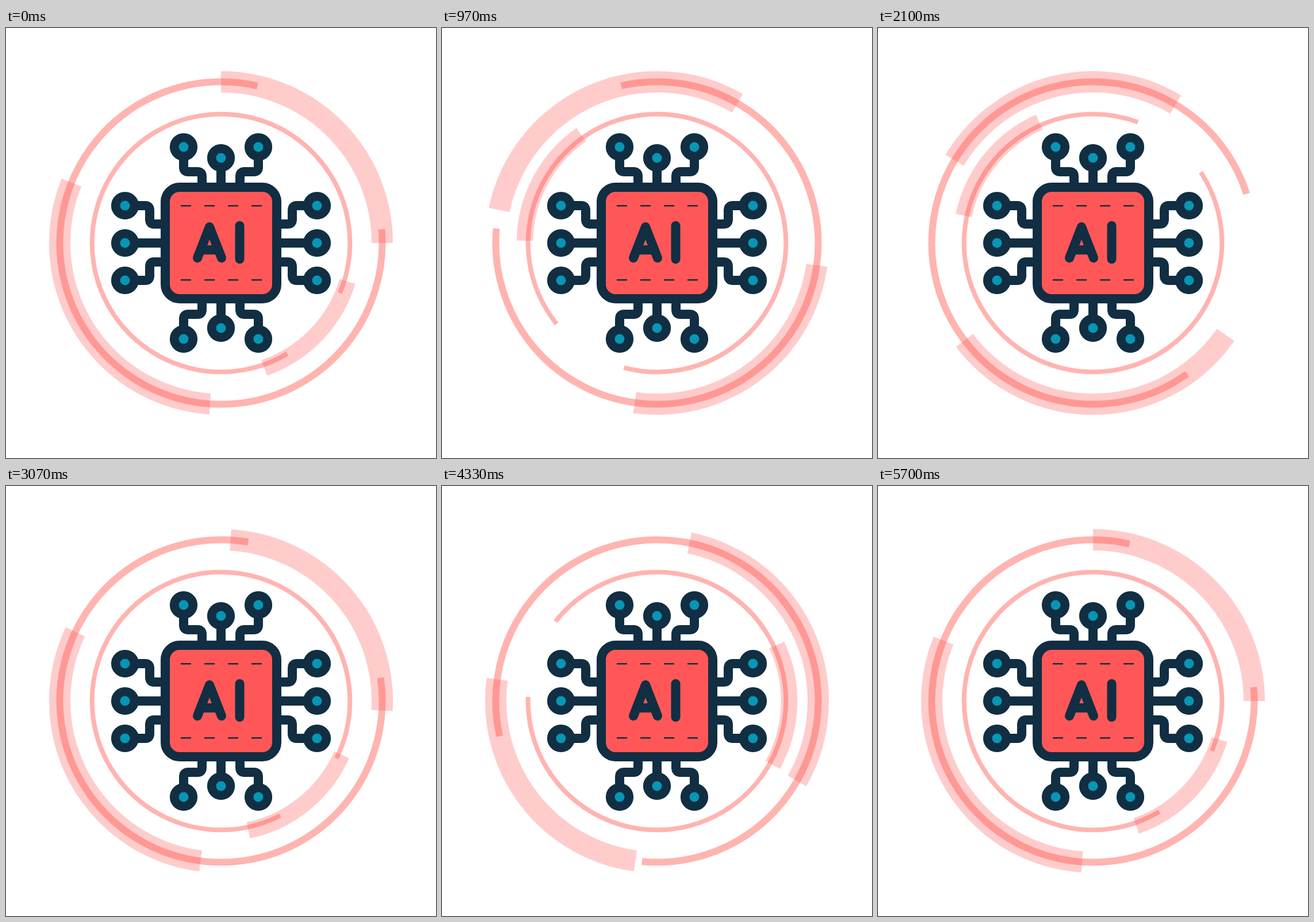
Animation of 748x748 px, one loop 5730 ms. Source, as an HTML page without scripts:

```html
<!DOCTYPE html>
<html lang="en">
<head>
<meta charset="utf-8">
<title>AI chip</title>
<style>
  @property --u { syntax: "<number>"; inherits: true; initial-value: 0; }

  html, body { margin: 0; width: 100%; height: 100%; overflow: hidden; background: #fff; }
  svg { display: block; width: 100vw; height: 100vh; }

  /* Two turns per loop, each in 36 held steps of 80 ms */
  .rings {
    animation: turn 5730ms infinite;
    --outer: calc(var(--u) * var(--u) * (3 - 2 * var(--u)));
    --inner: calc(
      0.051 * (1 - var(--u)) * (1 - var(--u)) * var(--u)
      + 2.331 * (1 - var(--u)) * var(--u) * var(--u)
      + var(--u) * var(--u) * var(--u));
  }
  @keyframes turn {
    0% { --u: 0; animation-timing-function: steps(36, jump-none); }
    50.262% { --u: 1; animation-timing-function: step-start; }
    50.263% { --u: 0; animation-timing-function: steps(35, jump-none); }
    99.127% { --u: 0.971429; animation-timing-function: step-start; }
    100% { --u: 1; }
  }

  .rings circle { fill: none; transform-origin: 374px 374px; }
  .band { stroke: #ff5757; stroke-opacity: .3; }
  .line { stroke: #ff544c; stroke-opacity: .44; }
  .a { transform: rotate(calc(-90deg + 360deg * var(--outer))); }
  .b { transform: rotate(calc(-4.9deg - 360deg * var(--outer))); }
  .c { transform: rotate(calc(59.1deg + 360deg * var(--inner))); }
  .d { transform: rotate(calc(16.9deg + 720deg * var(--inner))); }

  .chip { fill: none; stroke: #112e42; stroke-width: 16; }
  .node { fill: #0796b5; stroke-width: 15.6; }
  .body { fill: #ff5757; }
  .seam { stroke-width: 2.6; stroke-dasharray: 18 23; }
  .mark { stroke-linecap: round; stroke-linejoin: round; }
</style>
</head>
<body>
<svg viewBox="0 0 748 748" role="img" aria-label="AI">
  <defs>
    <circle id="node" class="node" r="16.3"/>
    <g id="bend">
      <path d="M309 215V242Q309 250 317 250H333Q341 250 341 258V275"/>
      <use href="#node" x="309" y="207"/>
    </g>
    <g id="side">
      <use href="#bend"/>
      <use href="#bend" transform="matrix(-1 0 0 1 748 0)"/>
    </g>
    <g id="tall">
      <path d="M374 235V275"/>
      <use href="#node" x="374" y="226"/>
    </g>
    <g id="wide">
      <path d="M215 374H275"/>
      <use href="#node" x="207" y="374"/>
    </g>
  </defs>

  <g class="rings">
    <circle class="band a" cx="374" cy="374" r="280.5" stroke-width="37" pathLength="360" stroke-dasharray="90 93.9 108.1 68"/>
    <circle class="line b" cx="374" cy="374" r="280.5" stroke-width="12" pathLength="360" stroke-dasharray="288 72"/>
    <circle class="band d" cx="374" cy="374" r="230" stroke-width="28.5" pathLength="360" stroke-dasharray="54 306"/>
    <circle class="line c" cx="374" cy="374" r="224.3" stroke-width="8" pathLength="360" stroke-dasharray="323.7 36.3"/>
  </g>

  <g class="chip">
    <use href="#side"/>
    <use href="#side" transform="rotate(90 374 374)"/>
    <use href="#side" transform="rotate(180 374 374)"/>
    <use href="#side" transform="rotate(270 374 374)"/>
    <use href="#tall"/>
    <use href="#tall" transform="rotate(180 374 374)"/>
    <use href="#wide"/>
    <use href="#wide" transform="rotate(180 374 374)"/>
    <rect class="body" x="277" y="277" width="194" height="194" rx="25"/>
    <path class="seam" d="M304 309.3H445M304 438.2H445"/>
    <path class="mark" d="M333 400L354 346L375 400M341 386H367M406.5 344V402"/>
  </g>
</svg>
</body>
</html>
```
